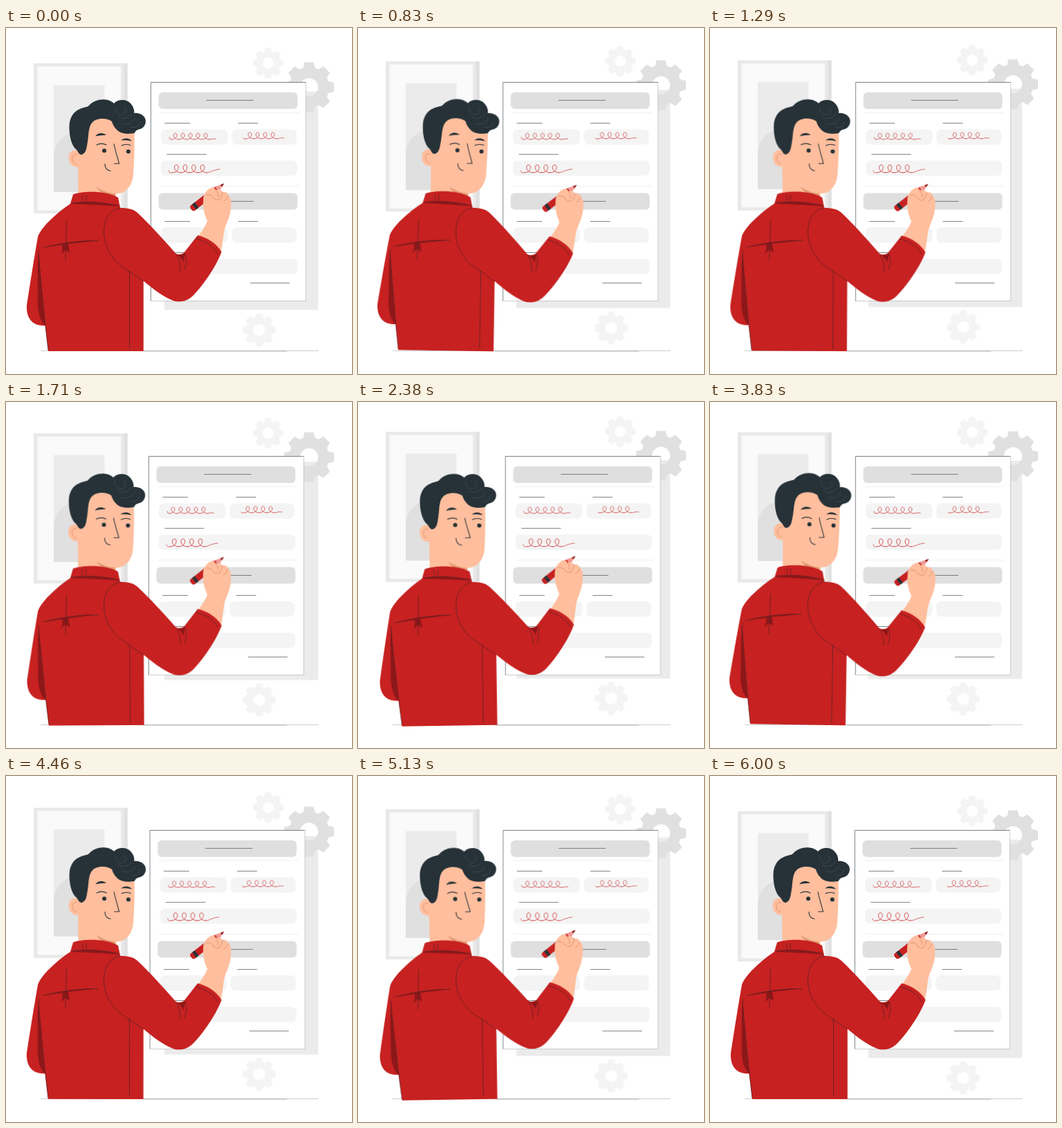
Animation of 500 by 500 pixels, one loop 6.04 s. Source, as an HTML page without scripts:

```html
<!DOCTYPE html>
<html lang="en">
<head>
<meta charset="utf-8">
<title>Filling in a form</title>
<style>
  html, body { margin: 0; width: 100%; height: 100%; overflow: hidden; background: #fff; }
  svg { display: block; width: 100vw; height: 100vh; }

  .float, .sheet, .man { animation: 6.04s linear infinite; }
  .float { animation-name: float; }
  .sheet { animation-name: shake; }
  .man { animation-name: sway; transform-origin: 178px 285px; }

  /* Six seconds of motion, then a 40 ms rest */
  @keyframes float {
    0%, 99.34%, 100% { transform: translateY(0); }
    49.67% { transform: translateY(-10px); }
  }
  @keyframes shake {
    0%, 99.34%, 100% { transform: translateX(0); }
    9.93%, 89.4% { transform: translateX(-1px); }
    19.87%, 79.47% { transform: translateX(2px); }
    29.8%, 49.67%, 69.54% { transform: translateX(-4px); }
    39.74%, 59.6% { transform: translateX(4px); }
  }
  @keyframes sway {
    0%, 99.34%, 100% { transform: rotate(0); }
    12.42%, 62.09% { transform: rotate(1deg); }
    37.25%, 86.92% { transform: rotate(-1deg); }
  }

  .bar { fill: #dfdfdf; }
  .field { fill: #f4f4f4; }
  .rule { stroke: #f0f0f0; }
  .label { stroke: #4a5358; stroke-width: .7; }
  .ink { fill: none; stroke: #cf3d3d; stroke-width: .75; stroke-linecap: round; }
  .red { fill: #c72121; }
  .fold { fill: #8d1719; }
  .skin { fill: #ffbe9d; }
  .hair { fill: #263238; }
  .seam { fill: none; stroke: #5a2326; stroke-width: .8; stroke-linecap: round; }
  .face { fill: none; stroke: #263238; stroke-width: 1.1; stroke-linecap: round; stroke-linejoin: round; }
  .crease { fill: none; stroke: #d98a68; stroke-width: .8; stroke-linecap: round; }
  .strand { fill: none; stroke: #4b575d; stroke-width: .6; }
</style>
</head>
<body>
<svg viewBox="0 0 500 500">
  <defs>
    <path id="tooth" d="M-9-26L-6.500-36H6.500L9-26Z"/>
    <g id="teeth">
      <use href="#tooth"/>
      <use href="#tooth" transform="rotate(90)"/>
      <use href="#tooth" transform="rotate(180)"/>
      <use href="#tooth" transform="rotate(270)"/>
    </g>
    <g id="gear">
      <circle r="21" fill="none" stroke="currentColor" stroke-width="16"/>
      <g fill="currentColor">
        <use href="#teeth"/>
        <use href="#teeth" transform="rotate(45)"/>
      </g>
    </g>
    <path id="loop" d="M0 0c6 0 8-4 8-6 0-4-5-4-5 0 0 3 3 6 8 6"/>
    <g id="loops">
      <use href="#loop"/>
      <use href="#loop" x="11"/>
      <use href="#loop" x="22"/>
      <use href="#loop" x="33"/>
    </g>
  </defs>

  <g class="float">
    <rect x="40" y="51" width="135.500" height="217" fill="#e9e9e9"/>
    <rect x="170.500" y="51" width="5" height="217" fill="#e0e0e0"/>
    <rect x="45.500" y="55.500" width="120.500" height="208" fill="#fafafa"/>
    <rect x="69" y="82.500" width="73.500" height="154.500" fill="#ebebeb"/>
    <path d="M69 237V186A36.700 36.700 0 0 1 142.500 186V237Z" fill="#e0e0e0"/>
    <rect x="229" y="92" width="222" height="315.500" fill="#ebebeb"/>
    <g color="#e0e0e0"><use href="#gear" transform="translate(438 85.500)"/></g>
    <g color="#f4f4f4">
      <use href="#gear" transform="translate(379 50.800) scale(.61)"/>
      <use href="#gear" transform="translate(366 436.300) scale(.66)"/>
    </g>
  </g>

  <path d="M50 466.500H452" stroke="#c4c9c7" stroke-width=".9"/>
  <path d="M198 467H406" stroke="#9ba09f" stroke-width=".7"/>

  <g class="sheet">
    <rect x="209.300" y="78.500" width="224" height="316" fill="#fff"/>
    <path d="M209.300 394.500V78.500H433.300" fill="none" stroke="#5b6367" stroke-width=".8"/>
    <path d="M433.300 78.500V394.500H209.300" fill="none" stroke="#8b9194" stroke-width=".45"/>
    <g class="bar">
      <rect x="220.500" y="93" width="200.800" height="24" rx="6"/>
      <rect x="220.500" y="238.500" width="200.800" height="24" rx="6"/>
    </g>
    <path class="rule" d="M223 122.500H424M223 228.500H424"/>
    <g class="field">
      <rect x="224" y="146.500" width="96.300" height="22" rx="7"/>
      <rect x="326.300" y="146.500" width="93.700" height="22" rx="7"/>
      <rect x="224" y="191.500" width="197" height="22" rx="7"/>
      <rect x="224" y="288.300" width="96.300" height="22" rx="7"/>
      <rect x="326.300" y="288.300" width="93.700" height="22" rx="7"/>
      <rect x="224" y="333.500" width="197" height="22" rx="7"/>
    </g>
    <path class="label" d="M289.500 104.500H357.500M289.500 250.500H358M229.300 137.500H266M335.300 137.500H364.300M232.300 182.500H289.500M229.300 279.500H266M335.300 279.500H364.300M232.300 324.500H289.500M353 368.500H410"/>
    <g class="ink">
      <path d="M236 158c0 2 1 3 3 3M294 161c4 0 5-2 9-.500M343 159c1 2 3 2 4 1M391 160c4 0 5-2 11-1"/>
      <use href="#loops" x="239" y="161"/>
      <use href="#loop" x="283" y="161"/>
      <use href="#loops" x="347" y="160"/>
      <path d="M235 206c0 3 3 4 5 3M290 209c6 0 8-4 19-5"/>
      <use href="#loops" transform="translate(240 209) scale(1.140 1.250)"/>
    </g>
  </g>

  <g class="man">
    <!-- pen and hand -->
    <g transform="translate(270 260) rotate(-38)">
      <rect x="-3" y="-4.700" width="48" height="9.400" rx="3.500" class="red"/>
      <rect x="2.500" y="-4.700" width="4.500" height="9.400" class="hair"/>
      <path d="M44-4.700L57 0 44 4.700Z" fill="#ef9a94"/>
      <path d="M52-1.900L57.500 0 52 1.900Z" fill="#8d1719"/>
    </g>
    <path class="skin" d="M276 304C282 295 288 287 291 279C287 270 284 260 285 248C285 240 290 234 296 231C299 229 302 231 303 234C307 232 311 234 313 237C318 236 321 239 321 242C325 244 326 250 325 258C325 270 319 281 316 290C314 298 314 307 311 322Z"/>
    <path class="crease" d="M289 241C295 240 299 243 300 246M303 234C306 237 307 241 306 244M313 237C313 241 311 244 309 247M321 242C320 246 318 248 315 250M300 246C303 249 307 249 309 247"/>

    <!-- neck and head -->
    <path class="skin" d="M104 190L104.500 246C120 254 146 255 160 250L158 232V190Z"/>
    <path d="M130 229C139 235 148 238 158 239V245C146 244 136 239 130 229Z" fill="#e0986f"/>
    <path class="skin" d="M106 178C98 174 90 179 90.500 188C91 198 99 203 108 200Z"/>
    <path class="crease" d="M103 183C97 181 94 186 97 193C98 195 100 196 102 196"/>
    <path class="skin" d="M104 205V150C108 132 122 123 145 124C166 126 182 138 185.500 152C186 174 185 195 184 211C183 228 173 240 158 239.500C140 238 120 226 104 205Z"/>
    <path class="hair" d="M109 183C105 183 104 178 102 176C95 171 91.500 157 91.500 144C91 131 97 120.500 107 117C112 114 117 115 120 112C126 105 138 101.500 147 104C151 105 154 107 156 109C161 103 174 102 180 109C184 113 186 119 185 123C192 122 200 126 201.500 132C203 139 199 145 192 146.500C189 147 187 149 185.500 152C178 153 166 154 160 147C156 143 154 139 153 135C145 129 131 130 125 136C118 143 120 157 117 170C116 177 114 182 109 183Z"/>
    <path class="strand" d="M158 114C157 123 165 128 171 124C175 121 174 115 170 116M162 128C167 133 178 130 181 124M167 137C174 141 184 138 186 130M180 143C186 146 194 141 193 135"/>
    <path class="hair" d="M129 156.500C133 151 140 151 145 154.500C140 155 134 155.500 129 156.500ZM166 162.500C171 158 178 158.500 182 163.500C177 162.500 171 162 166 162.500Z"/>
    <circle class="hair" cx="142" cy="177.200" r="3"/>
    <circle class="hair" cx="176.800" cy="178.400" r="3"/>
    <path class="face" d="M131 169C135 166.500 141 166.500 145 169M167 170C171 167.500 176 168 180 169.500M156 167.500C158 178 161 186 163.500 196H156.500M143 196.500C142.500 202 146 206 151 206.500"/>

    <!-- shirt -->
    <path class="red" d="M97 240.500C112 235 145 235 162 245L165 260C178 260 184 262 190 267C208 284 227 305 245 325.500C249 328 254 327 257 325L277 299.500C291 303 304 311 311.500 323.500C305 342 286 371 271 386C263 394 254 397 243 394.500C227 388.500 211 376 198.700 365.500V467H61L56.500 430C40 431 29 421 30 401C34 375 41 330 46 302C50 289 72 268 93 254Z"/>
    <path class="fold" d="M93 254C115 249 143 251 165 258C142 256 115 255 93 254Z"/>
    <path class="fold" d="M47 324C49 350 53 390 56.500 430C47 422 45 404 46 385C46 365 45 345 47 324Z"/>
    <path class="fold" d="M53 317.500C72 312 105 306 133 307.500C115 309 102 311 90 312L92 325 86 321 79 327C82 322 82 317 81 313.500Z"/>
    <path class="fold" d="M246 327C251 329 255 328 259 325C258 331 257 335 256 338C254 333 251 330 246 327Z"/>
    <g class="seam">
      <path d="M95 253C115 250 143 252 164 257M110 242C110 246 111 249 112 251M116 242V250"/>
      <path d="M87.500 279L86 336M53 317.500C80 311 109 307 133 307.500"/>
      <path d="M47 322C49 360 56 420 61 465"/>
      <path d="M165 260C147 264 141 280 141.500 297C142 315 152 332 164 342C176 351 188 358 198 365.500"/>
      <path d="M178.500 351V463"/>
      <path d="M275 304.500C288 308 301 315 305.500 326"/>
      <path d="M246 328C251 335 252 343 252 351M259 326C262 335 260 343 258 349"/>
    </g>
  </g>
</svg>
</body>
</html>
```
